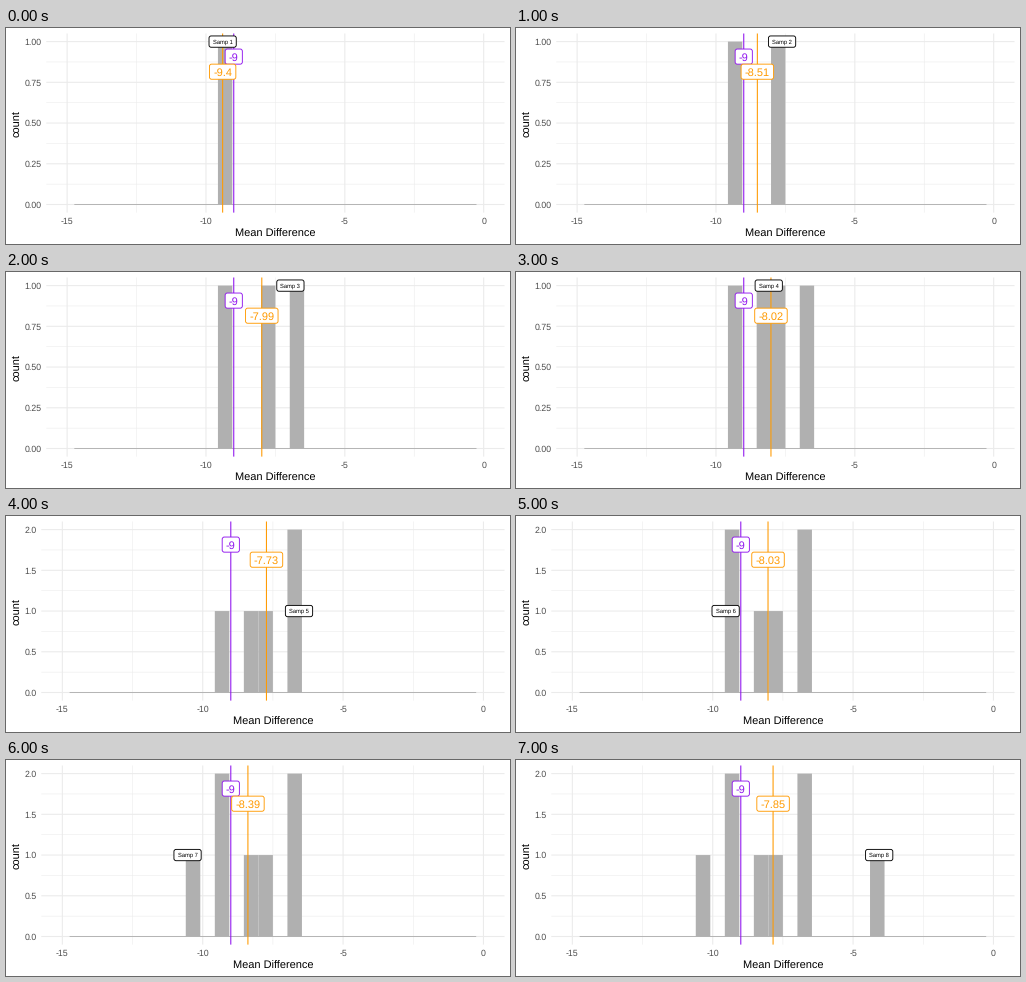
Write a matplotlib script that moves like this. It is 504 by 216 pixels and loops after 8 s.

```python
import matplotlib.pyplot as plt
import numpy as np
from matplotlib.animation import FuncAnimation
from matplotlib.patches import FancyBboxPatch, Rectangle

plt.rcParams["font.family"] = "Liberation Sans"
plt.rcParams["text.hinting"] = "none"

W, H, DPI = 504, 216, 72          # at 72 dpi one point is one pixel
TOP, BOTTOM, RIGHT = 5.5, 184.6, 498.5
ZERO_Y, PEAK_Y = 176.5, 13.6
GRID, BAR, TICK = "#EBEBEB", "#B0B0B0", "#4D4D4D"
PURPLE, ORANGE = "#9014EE", "#FF9A00"

SAMPLES = [-9.4, -7.62, -6.96, -8.1, -6.57, -9.54, -10.54, -4.07]
TRUE_DIFF = -9
BIN = 15 / 29
EDGES = -(np.arange(28, -1, -1) + 0.5) * BIN

fig = plt.figure(figsize=(W / DPI, H / DPI), dpi=DPI, facecolor="white")
ax = fig.add_axes([0, 0, 1, 1])


def line(x, y, color, width, z):
    ax.plot(x, y, color=color, lw=width, zorder=z, snap=False,
            solid_capstyle="butt")


def text(x, y, s, size, color="black", ha="center", z=9, **kw):
    return ax.text(x, y, s, size=size, color=color, ha=ha, va="baseline",
                   zorder=z, **kw)


def label(x, y, s, size, color, z):
    """Rounded white box with centred text."""
    cap = 0.72 * size
    t = text(x, y + cap / 2, s, size, color, z=z + 0.5)
    w = t.get_window_extent().width * DPI / fig.dpi + 7.4
    h = cap + 7.2
    ax.add_patch(FancyBboxPatch(
        (x - w / 2, y - h / 2), w, h,
        boxstyle="round,pad=0,rounding_size=2.2",
        fc="white", ec=color, lw=0.9, zorder=z, snap=False))


def draw(i):
    ax.clear()
    ax.set(xlim=(0, W), ylim=(H, 0))
    ax.axis("off")

    seen = SAMPLES[:i + 1]
    counts, _ = np.histogram(seen, EDGES)
    peak = counts.max()
    left = 40.3 if peak == 1 else 35.3
    unit = (RIGHT - left) / 16.5

    def px(v):
        return left + (v + 15.75) * unit

    def py(v):
        return ZERO_Y - (ZERO_Y - PEAK_Y) * v / peak

    # grid and axis text
    for k in range(7):
        x, major = px(-15 + 2.5 * k), k % 2 == 0
        line([x, x], [TOP, BOTTOM], GRID, 1.07 if major else 0.53, 1)
        if major:
            text(x, 195.8, f"{-15 + 2.5 * k:.0f}", 8.8, TICK)
    for k in range(9):
        v = peak * k / 8
        y, major = py(v), k % 2 == 0
        line([left, RIGHT], [y, y], GRID, 1.07 if major else 0.53, 1)
        if major:
            s = f"{v:.2f}" if peak == 1 else f"{v:.1f}"
            text(left - 4.9, y + 3.15, s, 8.8, TICK, ha="right")
    text((left + RIGHT) / 2, 209, "Mean Difference", 11)
    text(13.4, (TOP + BOTTOM) / 2, "count", 11, rotation=90,
         rotation_mode="anchor")

    # histogram
    line([px(EDGES[0]), px(EDGES[-1])], [ZERO_Y, ZERO_Y], BAR, 0.9, 2)
    for n, a in zip(counts, EDGES):
        if n:
            ax.add_patch(Rectangle((px(a), py(n)), BIN * unit, ZERO_Y - py(n),
                                   fc=BAR, lw=0, zorder=2, snap=False))

    # reference lines and labels
    mean = round(sum(seen) / len(seen), 2)
    for v, color in ((TRUE_DIFF, PURPLE), (mean, ORANGE)):
        line([px(v)] * 2, [TOP, BOTTOM], color, 1.07, 3)
    label(px(seen[-1]), py(1), f"Samp {i + 1}", 5.7, "black", 4)
    label(px(TRUE_DIFF), 28.6, f"{TRUE_DIFF}", 11, PURPLE, 5)
    label(px(mean), 43.7, f"{mean:g}", 11, ORANGE, 6)
    return []


anim = FuncAnimation(fig, draw, frames=len(SAMPLES), interval=1000,
                     init_func=lambda: [], repeat=True, repeat_delay=0)
plt.show()
```
